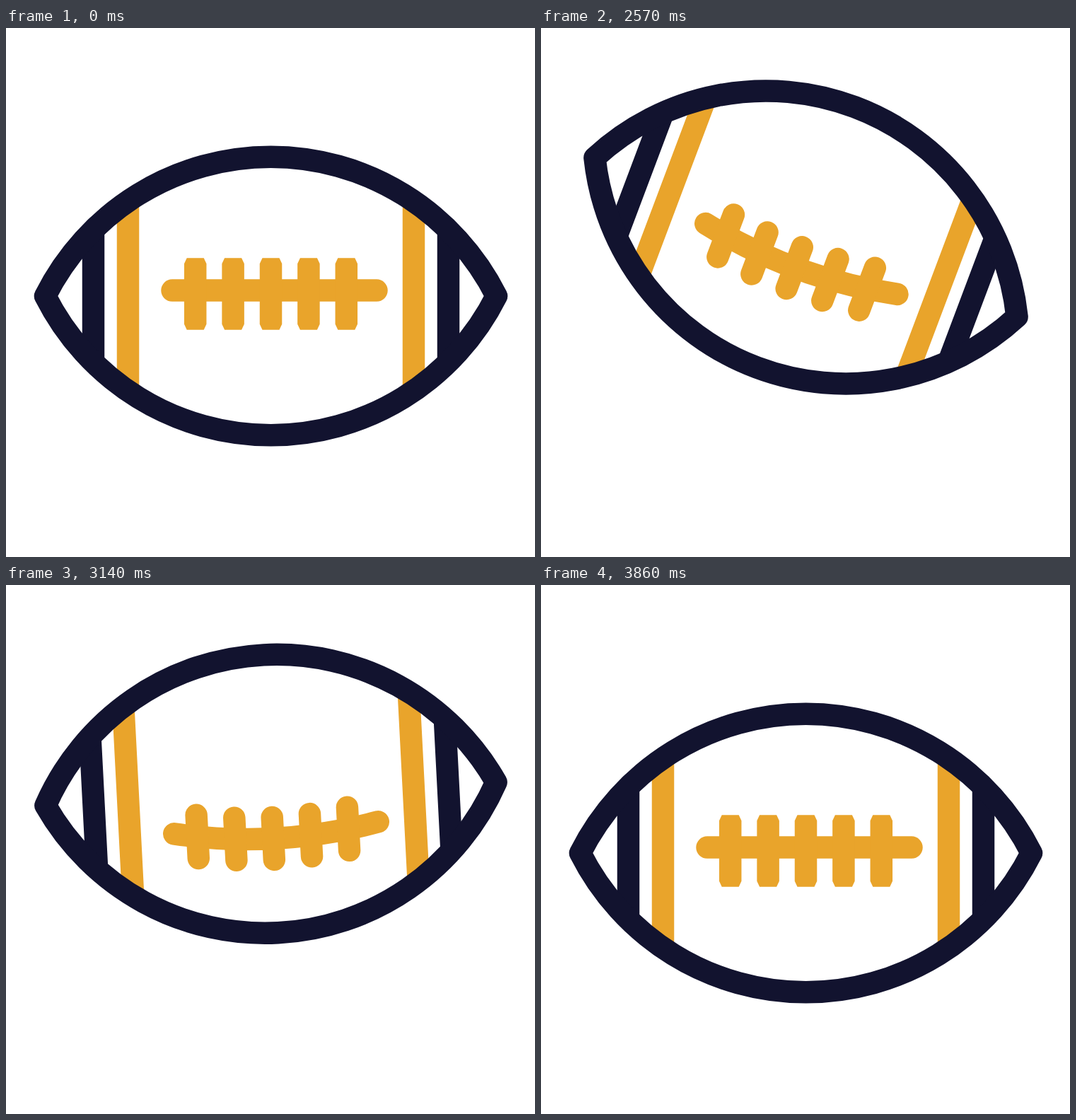
Recreate the animation shown at these times as an HTML page. Size 748 px wide and 748 px high, loop 3.89 s.

```html
<!DOCTYPE html>
<html lang="en">
<head>
<meta charset="utf-8">
<title>Spinning football</title>
<style>
  html, body { margin: 0; width: 100%; height: 100%; overflow: hidden; background: #fff; }
  svg { display: block; width: 100%; height: 100%; }
  .dark { stroke: #12132f; }
  .gold { stroke: #e9a42b; }
  path { fill: none; stroke-width: 31.5; stroke-linejoin: round; }
  #lace { stroke-linecap: round; }
  #stitches { fill: #e9a42b; stroke: none; }
</style>
</head>
<body>
<svg viewBox="0 0 748 748">
  <defs>
    <path id="shell" d="M-319 0A357 357 0 0 1 319 0A357 357 0 0 1 -319 0Z"/>
    <clipPath id="inside"><use href="#shell"/></clipPath>
  </defs>
  <g id="ball">
    <g clip-path="url(#inside)">
      <path class="gold" d="M-202 -200V200M202 -200V200"/>
      <path class="gold" id="lace"/>
      <path id="stitches"/>
      <path class="dark" d="M-251 -200V200M251 -200V200"/>
    </g>
    <use class="dark" href="#shell"/>
  </g>
</svg>
<script>
const LOOP = 3890, STEP = 30;
const START = 2000, TOP = 2260, DROP = 3600, END = 3860;
const CENTER_X = 374.5, REST_Y = 379, HALF = 15.75;
const TURN = 570, REST_LACE = -8;
const TILT_UP = 26.1, TILT_DOWN = -20;

const ball = document.getElementById('ball');
const lace = document.getElementById('lace');
const stitches = document.getElementById('stitches');

const mix = (a, b, p) => a + (b - a) * p;
const progress = (t, from, to) => Math.min(1, Math.max(0, (t - from) / (to - from)));

// Cubic Bezier easing through (x1, 0) and (x2, 1)
function ease(u, x1 = .33, x2 = .67) {
  let low = 0, high = 1;
  for (let i = 0; i < 24; i++) {
    const s = (low + high) / 2, r = 1 - s;
    if (3 * x1 * s * r * r + 3 * x2 * s * s * r + s ** 3 < u) low = s;
    else high = s;
  }
  return low * low * (3 - 2 * low);
}

// Height while the ball hangs in the air
const flight = u => 291 + 90 * (u - .45) ** 2 + 260 * (u - .45) ** 4;

function pose(t) {
  if (t < TOP) {
    const u = progress(t, START, TOP);
    return { angle: TILT_UP * ease(u), y: mix(REST_Y, flight(0), ease(u, .7, .8)) };
  }
  if (t < DROP) {
    const u = progress(t, TOP, DROP);
    return { angle: mix(TILT_UP, TILT_DOWN, ease(u, .33, .83)), y: flight(u) };
  }
  const p = ease(progress(t, DROP, END));
  return { angle: mix(TILT_DOWN, 0, p), y: mix(flight(1), REST_Y, p) };
}

// Three forward turns that slow down towards the end, wrapped to one turn
function laceOffset(t) {
  const x = progress(t, START, END);
  const roll = REST_LACE + 3 * TURN * (x + x * (1 - x) * (.256 + .635 * x ** 3));
  return roll - TURN * Math.round(roll / TURN);
}

function cap(square, dir) {
  return square
    ? `v${-8 * dir}l${3.75 * dir} ${-8 * dir}h${24 * dir}l${3.75 * dir} ${8 * dir}v${8 * dir}`
    : `a${HALF} ${HALF} 0 0 1 ${2 * HALF * dir} 0`;
}

function stitch(x, y, square) {
  const reach = 35 - .08 * Math.abs(y);
  return `M${x - HALF} ${y - reach}${cap(square, 1)}V${y + reach}${cap(square, -1)}Z`;
}

function draw(t) {
  const time = START + Math.max(0, Math.floor((t - START) / STEP)) * STEP;
  const { angle, y } = pose(time);
  ball.setAttribute('transform', `translate(${CENTER_X} ${y}) rotate(${angle})`);

  const mid = laceOffset(time);
  const bow = 15 * Math.max(-1, Math.min(1, (mid / 45) ** 3));
  const laceY = x => mid - bow * (x / 145) ** 2;
  const left = -139.5, right = 149.5;
  const controlY = mid - bow * left * right / 145 ** 2;
  lace.setAttribute('d',
    `M${left} ${laceY(left)}Q${(left + right) / 2} ${controlY} ${right} ${laceY(right)}`);

  const shift = 5 * Math.max(0, 1 - Math.abs(mid - REST_LACE) / 60);
  const square = Math.abs(angle) < 2.5;
  let outline = '';
  for (let i = -2; i <= 2; i++) {
    const x = i * 53.4;
    outline += stitch(x, laceY(x) + shift, square);
  }
  stitches.setAttribute('d', outline);
}

const begin = performance.now();
function tick() {
  draw((performance.now() - begin) % LOOP);
  requestAnimationFrame(tick);
}
tick();
</script>
</body>
</html>
```
